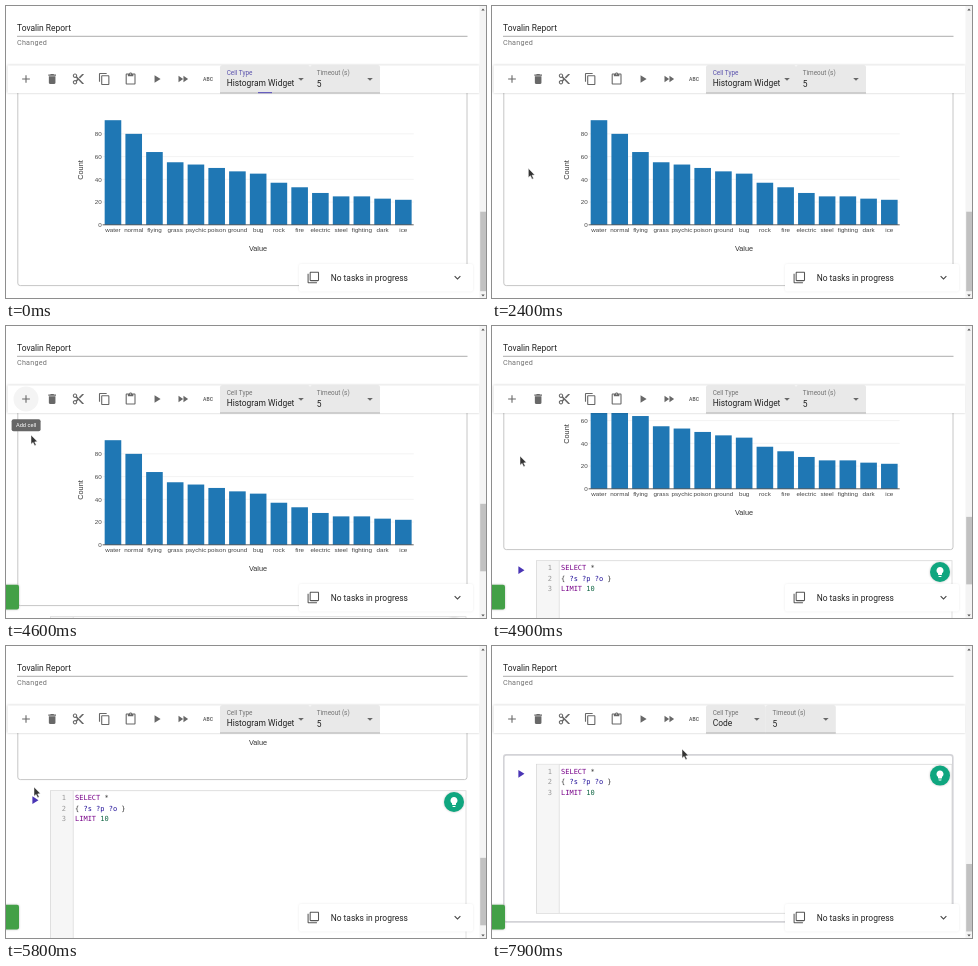
Animation of 480 by 292 pixels, one loop 8000 ms. Source, as an HTML page:

```html
<!DOCTYPE html>
<html lang="en">
<head>
<meta charset="utf-8">
<title>Notebook</title>
<style>
  html, body { margin: 0; width: 100%; height: 100%; overflow: hidden; background: #fff; }
  svg { display: block; width: 100vw; height: 100vh; }
  text { font: 8.45px Roboto, sans-serif; fill: #222; white-space: pre; }
  .small { font-size: 6.4px; fill: #737373; }
  .tick { font: 6.25px "Liberation Sans", Arial, sans-serif; fill: #444; }
  .axis { font: 7.3px "Liberation Sans", Arial, sans-serif; fill: #333; }
  .code { font: 7px "DejaVu Sans Mono", monospace; fill: #333; }
  .key { fill: #708; }
  .var { fill: #219; }
  .num { fill: #164; }
  .icon { fill: #686868; }
  .raised { filter: drop-shadow(0 .6px 1px rgba(0, 0, 0, .24)); }
  .soft { filter: drop-shadow(0 0 1px rgba(0, 0, 0, .08)); }
</style>
</head>
<body>
<svg id="stage" viewBox="0 0 480 292">
  <rect width="480" height="292" fill="#fff"/>

  <g id="page">
    <rect id="card1" x="11.8" y="40" width="449.2" height="239.6" rx="2.5" fill="none" stroke="#c6c6c6"/>
    <g id="chart"></g>
    <g id="cell">
      <rect id="card2" x="11.8" y="281.3" width="449" height="167" rx="2.5" fill="none" stroke="#d3d3d7" stroke-width="1.6"/>
      <rect x="44.5" y="290.7" width="415.5" height="149" fill="#fff" stroke="#d8d8d8" stroke-width=".8"/>
      <rect x="45" y="291.1" width="22" height="148.2" fill="#f6f6f6"/>
      <path d="M67.3 291V439.4" stroke="#ddd" stroke-width=".8"/>
      <g id="code"></g>
      <circle class="raised" cx="448" cy="302" r="10" fill="#0fa67f"/>
    </g>
  </g>

  <rect width="473" height="60" fill="#fff"/>
  <text x="11" y="25.2">Tovalin Report</text>
  <path d="M11 30.3H461.5" stroke="#999" stroke-width=".8"/>
  <text class="small" x="11" y="38.8" style="font-size:7.2px;letter-spacing:.033em">Changed</text>

  <rect class="raised" x="1.5" y="59.3" width="472" height="27.7" fill="#fff"/>
  <circle id="hover" cx="20" cy="73" r="12.5" fill="#f4f4f4"/>
  <g id="tools"></g>
  <text x="202" y="75" text-anchor="middle" style="font-size:5px;font-weight:700;fill:#686868">ABC</text>
  <g id="fields">
    <path id="typeBox" fill="#e9e9e9"/>
    <text id="typeLabel" class="small" x="220.7" y="69.3">Cell Type</text>
    <text id="typeValue" x="220.7" y="80"></text>
    <path id="typeArrow" class="icon" d="M-2.8 -1.3H2.8L0 1.5Z"/>
    <rect id="focus" y="86" height="1.2" fill="#4b3fd0"/>
    <g id="timeout">
      <path d="M0 87V61.5Q0 59 2.5 59H67.5Q70 59 70 61.5V87Z" fill="#e9e9e9"/>
      <path d="M0 87H70" stroke="#999" stroke-width=".7"/>
      <text class="small" x="6.7" y="69.3">Timeout (s)</text>
      <text x="6.7" y="80.5">5</text>
      <path class="icon" d="M57.2 71.9H62.8L60 74.7Z"/>
    </g>
    <path id="typeLine" stroke="#999" stroke-width=".7"/>
  </g>

  <rect class="soft" x="293" y="258" width="174" height="27.5" rx="2" fill="#fff"/>
  <g id="tasks"></g>
  <text x="324.7" y="274.6">No tasks in progress</text>

  <rect id="toast" class="raised" x="-8" y="258.8" width="21" height="24.6" rx="2" fill="#43a047"/>
  <g id="tip">
    <rect x="5.6" y="93.2" width="29" height="12" rx="2" fill="#666"/>
    <text x="20.1" y="101.2" text-anchor="middle" style="font-size:5.7px;fill:#fff">Add cell</text>
  </g>

  <rect x="473.5" width="6.5" height="292" fill="#f4f4f4"/>
  <path d="M475.3 4.4L477 2.4L478.7 4.4ZM475.3 288.6L477 290.6L478.7 288.6Z" fill="#555"/>
  <rect id="thumb" x="474.2" width="5.8" fill="#c1c1c1"/>

  <path id="arrow" d="M0 0V9.2L2.1 7.4L3.7 10.8L5.2 10.1L3.7 6.9L6.4 6.6Z" fill="#333" stroke="#fff" stroke-width=".5"/>
  <path id="hand" d="M19.3 68.5Q20.3 67.3 21.2 68.5V71.6L25 72.4Q26.2 72.8 26 74L25.2 77.6H19.6L16.6 73.9Q16.7 72.6 18 73.2L19.3 74.2Z" fill="#333" stroke="#fff" stroke-width=".5"/>
</svg>

<script>
const NS = 'http://www.w3.org/2000/svg';
const $ = id => document.getElementById(id);

function add(parent, tag, attrs, text) {
  const el = document.createElementNS(NS, tag);
  for (const k in attrs) el.setAttribute(k, attrs[k]);
  if (text !== undefined) el.textContent = text;
  return parent.appendChild(el);
}
const set = (id, attrs) => { for (const k in attrs) $(id).setAttribute(k, attrs[k]); };
const show = (id, on) => { $(id).style.display = on ? '' : 'none'; };

// Icons live on a 24-unit grid, placed by their centre.
const icons = {
  add: 'M19 13h-6v6h-2v-6H5v-2h6V5h2v6h6v2z',
  bin: 'M6 19c0 1.1.9 2 2 2h8c1.1 0 2-.9 2-2V7H6v12zM19 4h-3.5l-1-1h-5l-1 1H5v2h14V4z',
  cut: 'M9.64 7.64c.23-.5.36-1.05.36-1.64 0-2.21-1.79-4-4-4S2 3.79 2 6s1.79 4 4 4c.59 0 1.14-.13 1.64-.36L10 12l-2.36 2.36C7.14 14.13 6.59 14 6 14c-2.21 0-4 1.79-4 4s1.79 4 4 4 4-1.79 4-4c0-.59-.13-1.14-.36-1.64L12 14l7 7h3v-1L9.64 7.64zM6 8c-1.1 0-2-.89-2-2s.9-2 2-2 2 .89 2 2-.9 2-2 2zm0 12c-1.1 0-2-.89-2-2s.9-2 2-2 2 .89 2 2-.9 2-2 2zM19 3l-6 6 2 2 7-7V3z',
  copy: 'M16 1H4c-1.1 0-2 .9-2 2v14h2V3h12V1zm3 4H8c-1.1 0-2 .9-2 2v14c0 1.1.9 2 2 2h11c1.1 0 2-.9 2-2V7c0-1.1-.9-2-2-2zm0 16H8V7h11v14z',
  paste: 'M19 2h-4.18C14.4.84 13.3 0 12 0c-1.3 0-2.4.84-2.82 2H5c-1.1 0-2 .9-2 2v16c0 1.1.9 2 2 2h14c1.1 0 2-.9 2-2V4c0-1.1-.9-2-2-2zm-7 0c.55 0 1 .45 1 1s-.45 1-1 1-1-.45-1-1 .45-1 1-1zm7 18H5V4h2v3h10V4h2v16z',
  play: 'M8 5v14l11-7z',
  forward: 'M4 18l8.5-6L4 6v12zm9-12v12l8.5-6L13 6z',
  stack: 'M3 5H1v16c0 1.1.9 2 2 2h16v-2H3V5zm18-4H7c-1.1 0-2 .9-2 2v14c0 1.1.9 2 2 2h14c1.1 0 2-.9 2-2V3c0-1.1-.9-2-2-2zm0 16H7V3h14v14z',
  more: 'M16.59 8.59L12 13.17 7.41 8.59 6 10l6 6 6-6z',
  bulb: 'M9 21c0 .55.45 1 1 1h4c.55 0 1-.45 1-1v-1H9v1zm3-19C8.14 2 5 5.14 5 9c0 2.38 1.19 4.47 3 5.74V17c0 .55.45 1 1 1h6c.55 0 1-.45 1-1v-2.26c1.81-1.27 3-3.36 3-5.74 0-3.86-3.14-7-7-7z'
};
function icon(parent, name, x, y, fill = '#686868', size = 13.2) {
  add(parent, 'path', { d: icons[name], fill,
    transform: `translate(${x} ${y}) scale(${size / 24}) translate(-12 -12)` });
}
['add', 'bin', 'cut', 'copy', 'paste', 'play', 'forward'].forEach((name, i) =>
  icon($('tools'), name, 20 + i * 26.15, 73));
icon($('tasks'), 'stack', 307.3, 271.5, '#555', 12.5);
icon($('tasks'), 'more', 451.5, 271.5, '#444', 13);
icon($('cell'), 'play', 28.6, 300.2, '#4a35b5');
icon($('cell'), 'bulb', 448, 302, '#fff', 12);

function drawChart() {
  const g = $('chart'), base = 218.8, unit = 1.137, left = 96.6, step = 20.74;
  const counts = { water: 92, normal: 80, flying: 64, grass: 55, psychic: 53,
    poison: 50, ground: 47, bug: 45, rock: 37, fire: 33, electric: 28,
    steel: 25, fighting: 25, dark: 23, ice: 22 };
  for (let v = 0; v <= 80; v += 20) {
    const y = base - v * unit;
    add(g, 'path', { d: `M${left} ${y}H407.7`, stroke: '#eee', 'stroke-width': .7 });
    add(g, 'text', { class: 'tick', x: 95.8, y: y + 2.2, 'text-anchor': 'end' }, v);
  }
  Object.entries(counts).forEach(([name, n], i) => {
    const mid = left + (i + .5) * step;
    add(g, 'rect', { x: mid - 8.3, y: base - n * unit, width: 16.6, height: n * unit, fill: '#1f77b4' });
    add(g, 'text', { class: 'tick', x: mid, y: 225.7, 'text-anchor': 'middle' }, name);
  });
  add(g, 'path', { d: `M${left} ${base}H407.7`, stroke: '#444', 'stroke-width': .8 });
  add(g, 'text', { class: 'axis', x: 252, y: 245, 'text-anchor': 'middle' }, 'Value');
  add(g, 'text', { class: 'axis', 'text-anchor': 'middle', transform: 'translate(77.3 164) rotate(-90)' }, 'Count');
}
drawChart();

const lines = [
  [['SELECT', 'key'], [' *']],
  [['{ '], ['?s ?p ?o', 'var'], [' }']],
  [['LIMIT', 'key'], [' '], ['10', 'num']]
];
lines.forEach((parts, i) => {
  const y = 300.2 + i * 10.5;
  add($('code'), 'text', { class: 'code', x: 60, y, 'text-anchor': 'end', style: 'fill:#999' }, i + 1);
  const row = add($('code'), 'text', { class: 'code', x: 69, y });
  for (const [s, kind] of parts) add(row, 'tspan', kind ? { class: kind } : {}, s);
});

// Tracks: [ms, values...], linear in between.
const pointer = [[500, 6, 225], [700, 6, 225], [800, 13, 222], [900, 25, 216], [1000, 36, 210],
  [1100, 43, 207], [1200, 45, 206], [2100, 45, 206], [2200, 43, 197], [2500, 33, 145],
  [2800, 20, 88], [3000, 18, 75], [4400, 18, 75], [4500, 23, 93], [4600, 25, 109],
  [4700, 26.5, 118], [4800, 27.6, 126], [4900, 28, 130], [5300, 28, 141], [6200, 28, 141],
  [6300, 25, 152], [6400, 21, 163], [7200, 21, 163], [7300, 42, 154], [7500, 42, 154],
  [7600, 82, 140], [7700, 138, 120], [7800, 178, 107], [7900, 190, 103]];
const scroll = [[4600, 0], [4900, 56], [5800, 146], [6200, 172.4]];
const focusWidth = [[0, 14], [100, 5], [200, 1], [300, 0]];

function at(track, t) {
  if (t <= track[0][0]) return track[0].slice(1);
  const i = track.findIndex(k => k[0] > t);
  if (i < 0) return track[track.length - 1].slice(1);
  const a = track[i - 1], b = track[i], f = (t - a[0]) / (b[0] - a[0]);
  return a.slice(1).map((v, j) => v + (b[j + 1] - v) * f);
}

function setType(name, right) {
  $('typeValue').textContent = name;
  set('typeBox', { d: `M214 87V61.5Q214 59 216.5 59H${right - 2.5}Q${right} 59 ${right} 61.5V87Z` });
  set('typeLine', { d: `M214 87H${right}` });
  set('typeArrow', { transform: `translate(${right - 9} 73.2)` });
  set('timeout', { transform: `translate(${right} 0)` });
}

function draw(t) {
  const added = t >= 4000, chosen = t >= 6600;
  const [y] = at(scroll, t);
  set('page', { transform: `translate(0 ${-y})` });
  show('cell', added);
  show('card1', !chosen);
  show('card2', chosen);
  set('thumb', added ? { y: 177.8 + y * .233, height: 67.5 } : { y: 205.7, height: 79.5 });

  chosen ? setType('Code', 273.8) : setType('Histogram Widget', 304);
  $('typeLabel').style.fill = t < 4200 ? '#5a52ad' : '#737373';
  const [w] = at(focusWidth, t);
  set('focus', { x: 259 - w / 2, width: w });

  show('hover', t >= 3200 && t < 4700);
  show('tip', t >= 3400 && t < 4700);
  $('tip').style.opacity = t < 3500 ? .5 : 1;
  show('toast', t >= 4200);

  const pressing = t >= 3100 && t < 4500;
  const [px, py] = at(pointer, t);
  show('hand', pressing);
  show('arrow', t >= 500 && !pressing);
  set('arrow', { transform: `translate(${px} ${py})` });
}

const start = performance.now();
function tick() {
  const t = (performance.now() - start) % 8000;
  draw(Math.floor(t / 100) * 100);
  requestAnimationFrame(tick);
}
draw(0);
requestAnimationFrame(tick);
</script>
</body>
</html>
```
